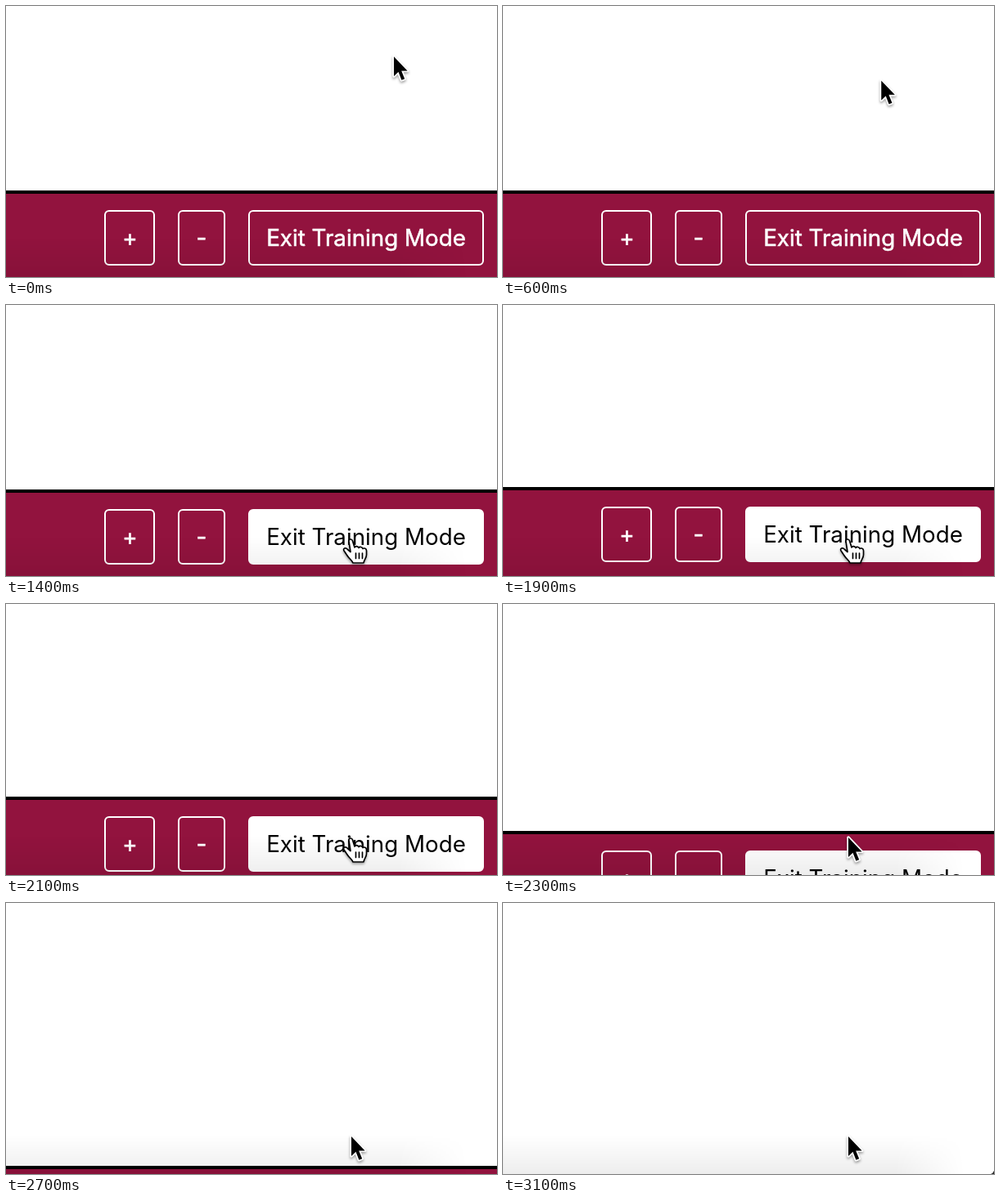
An HTML page for the animation above (3.7 s loop, 600 by 332 pixels).

```html
<!DOCTYPE html>
<html lang="en">
<head>
<meta charset="utf-8">
<title>Exit Training Mode</title>
<style>
  html, body { margin: 0; width: 100%; height: 100%; overflow: hidden; background: #fff; }
  svg { display: block; width: 100%; height: 100%; }
  text { font: 400 27.75px Inter, "Liberation Sans", sans-serif; text-anchor: middle; fill: #fff; stroke: #fff; stroke-width: .6; }
  .button { fill: none; stroke: #fff; stroke-width: 2; }
  .cursor { filter: drop-shadow(0 2px 1.5px rgba(0, 0, 0, .35)); }
</style>
</head>
<body>
<svg viewBox="0 0 600 332">
  <defs>
    <linearGradient id="shade" x2="0" y2="1">
      <stop stop-opacity="0"/>
      <stop offset="1" stop-opacity=".07"/>
    </linearGradient>
    <linearGradient id="fade">
      <stop offset=".8" stop-color="#fff"/>
      <stop offset=".94" stop-color="#000"/>
    </linearGradient>
    <mask id="fadeRight"><rect y="280" width="600" height="52" fill="url(#fade)"/></mask>
  </defs>

  <path d="M600 328Q599 331 596 332H600Z" fill="#222"/>
  <g id="bar">
    <rect y="226" width="600" height="112" fill="#92133e"/>
    <rect y="226" width="600" height="4"/>
    <rect class="button" x="121" y="251" width="60" height="66" rx="5"/>
    <text x="151.5" y="293.5">+</text>
    <rect class="button" x="211" y="251" width="56" height="66" rx="5"/>
    <text x="239" y="294">-</text>
    <rect class="button" x="297" y="251" width="286" height="66" rx="5"/>
    <rect id="fill" x="297" y="251" width="286" height="66" rx="5" fill="#fff"/>
    <text id="label" x="440" y="294">Exit Training Mode</text>
  </g>
  <rect y="284" width="600" height="48" fill="url(#shade)" mask="url(#fadeRight)"/>

  <g id="arrow" class="cursor">
    <path d="M0 0V24L5.5 18.8L9.4 28.8L13.2 27.2L9.2 17.4H16.6Z"
          stroke="#fff" stroke-width="3.4" stroke-linejoin="round" paint-order="stroke"/>
  </g>
  <g id="hand" class="cursor">
    <g transform="translate(-1 1)" stroke="#000" stroke-width="1.7" stroke-linejoin="round" stroke-linecap="round">
      <path fill="#fff" d="M-2 2.6C-2.6 -.4 1.6 -1 2.5 2L5 10C6 8 9 8 10 10.5C11 9 14 9 15 11.5C16.5 10.5 19.5 11 19.5 14V19C19.5 23 16.5 25 16 29H3C2 26 -1.5 24 -4 20L-8 14C-9.5 11 -6 9.5 -3.5 12.5L0 15.5Z"/>
      <path fill="none" d="M6.5 17V23.5M10.5 17V23.5M14.5 17V23.5"/>
    </g>
  </g>
</svg>
<script>
const LOOP = 3700, STEP = 100;

const $ = id => document.getElementById(id);
const [bar, fill, label, arrow, hand] = ["bar", "fill", "label", "arrow", "hand"].map($);

const ramp = (t, from, duration) => Math.min(1, Math.max(0, (t - from) / duration));
const smooth = u => u * u * (3 - 2 * u);
const mix = (a, b, u) => a + (b - a) * u;

// A short lift, then a critically damped fall that leaves only the top edge.
function barDrop(t) {
  const lift = 3 * Math.sin(Math.PI * ramp(t, 1800, 300));
  const fall = 5.07 * ramp(t, 2010, 890);
  return Math.round(106 * (1 - (1 + fall) * Math.exp(-fall)) - lift);
}

function draw(t) {
  const x = mix(474, 422, smooth(ramp(t, 400, 650)));
  const y = mix(62, 286, smooth(ramp(t, 400, 880)));
  const lit = ramp(t, 1000, 250) - ramp(t, 2300, 200);
  const isHand = t >= 1100 && t < 2300;

  bar.setAttribute("transform", `translate(0 ${barDrop(t)})`);
  bar.style.display = t < 3100 ? "" : "none";
  fill.style.opacity = lit;
  label.style.fill = `rgb(${Array(3).fill(Math.round(255 * (1 - lit)))})`;
  label.style.strokeOpacity = 1 - lit;
  for (const cursor of [arrow, hand]) cursor.setAttribute("transform", `translate(${x} ${y})`);
  arrow.style.display = isHand ? "none" : "";
  hand.style.display = isHand ? "" : "none";
}

const start = performance.now();
function tick() {
  const t = (performance.now() - start) % LOOP;
  draw(Math.floor(t / STEP) * STEP);
  requestAnimationFrame(tick);
}
tick();
</script>
</body>
</html>
```
